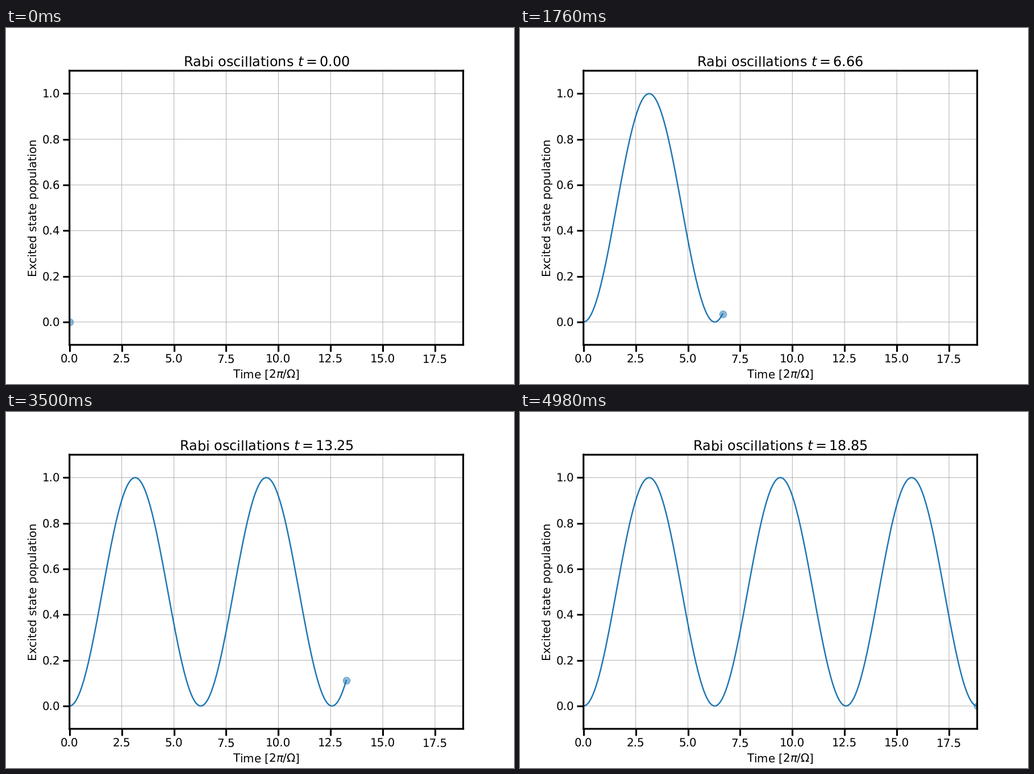
Animation, 894 px wide and 626 px high, one loop 5 s. Source, as a matplotlib script:

```python
import numpy as np
import matplotlib.pyplot as plt
from matplotlib.animation import FuncAnimation

WIDTH, HEIGHT, DPI = 894, 626, 72
PT = WIDTH / 720  # one point of a ten inch wide layout, in pixels
FRAMES, INTERVAL = 250, 20
BLUE = "#1f77b4"

plt.rcParams.update({
    "font.family": "DejaVu Sans",
    "font.size": 16 * PT,
    "text.hinting": "none",
    "path.snap": False,
    "axes.titlesize": 19.2 * PT,
    "axes.titlepad": 6 * PT,
    "axes.labelpad": 4 * PT,
    "axes.linewidth": 2.5 * PT,
    "grid.linewidth": 0.8 * PT,
    "grid.color": "#b0b0b0",
})
for axis in ("xtick", "ytick"):
    plt.rcParams.update({
        f"{axis}.major.size": 10 * PT,
        f"{axis}.major.width": 2.5 * PT,
        f"{axis}.major.pad": 3.5 * PT,
    })

time = np.linspace(0, 6 * np.pi, FRAMES)
population = np.sin(time / 2) ** 2

fig, ax = plt.subplots(figsize=(WIDTH / DPI, HEIGHT / DPI), dpi=DPI)
fig.subplots_adjust(left=0.125, right=0.9, bottom=0.11, top=0.88)
ax.set(xlim=(0, time[-1]), ylim=(-0.1, 1.1),
       xlabel=r"Time [$2\pi/\Omega$]", ylabel="Excited state population")
ax.set_xticks(np.arange(0, 18, 2.5))
ax.set_yticks(np.linspace(0, 1, 6))
ax.grid(True)

curve, = ax.plot([], [], color=BLUE, lw=2 * PT)
dot, = ax.plot([], [], "o", color=BLUE, alpha=0.5, ms=10 * PT, mew=PT)
title = ax.set_title("")


def update(i):
    curve.set_data(time[:i + 1], population[:i + 1])
    dot.set_data([time[i]], [population[i]])
    title.set_text(f"Rabi oscillations $t={time[i]:.2f}$")
    return curve, dot, title


anim = FuncAnimation(fig, update, frames=FRAMES, init_func=lambda: update(0),
                     interval=INTERVAL, repeat=True, repeat_delay=0)
plt.show()
```
